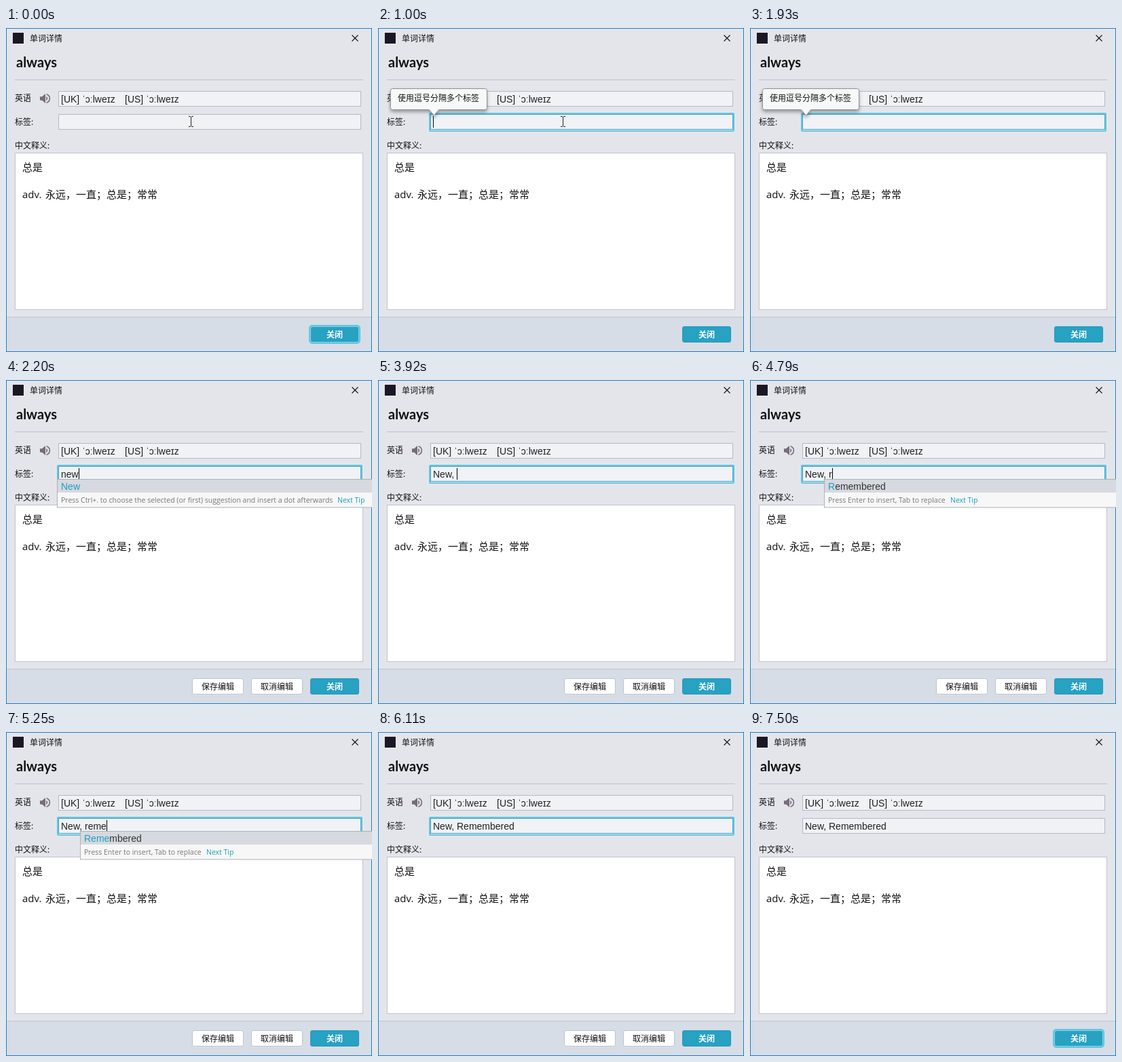
Animation of 539 by 478 pixels, one loop 8500 ms. Source, as an HTML page:

```html
<!DOCTYPE html>
<html lang="zh-CN">
<head>
<meta charset="utf-8">
<title>单词详情</title>
<style>
  html, body { margin: 0; width: 100%; height: 100%; overflow: hidden; background: #e4e5eb; }
  svg { display: block; }
  text { white-space: pre; fill: #111; }
  .cjk { font: 12px "Noto Sans CJK SC", "Noto Sans CJK", sans-serif; }
  .head { font: bold 20px Lato, sans-serif; }
  .body { font: 15px "Open Sans", "Noto Sans CJK SC", "Noto Sans CJK", sans-serif; }
  .field { font: 14px "Liberation Sans", Arial, sans-serif; fill: #1e2022; }
  .item { font: 14px "Liberation Sans", Arial, sans-serif; fill: #333; }
  .hint { font: 10.5px "Open Sans", sans-serif; fill: #777; }
  .accent { fill: #1a9fc6; }
  .link { fill: #17a0b8; }
  .primary { font-weight: bold; fill: #fff; }
</style>
</head>
<body>
<svg id="stage" width="539" height="478" viewBox="0 0 539 478">
  <defs>
    <filter id="shadow" x="-20%" y="-30%" width="140%" height="180%">
      <feDropShadow dx="0" dy="3" stdDeviation="2.8" flood-color="#000" flood-opacity=".35"/>
    </filter>
  </defs>
  <g id="base"></g>
  <g id="live"></g>
</svg>
<script>
const LOOP = 8500;
const FIELD_X = 81;
const RING = '#62c3dc';

const rect = (x, y, w, h, fill, stroke = 'none', rx = 0, sw = 1) =>
  `<rect x="${x}" y="${y}" width="${w}" height="${h}" rx="${rx}" fill="${fill}" stroke="${stroke}" stroke-width="${sw}"/>`;
const text = (x, y, cls, content) => `<text x="${x}" y="${y}" class="${cls}">${content}</text>`;
const line = (d, stroke, sw = 1) => `<path d="${d}" fill="none" stroke="${stroke}" stroke-width="${sw}"/>`;
const inputBox = y => rect(77.5, y + .5, 445, 22, '#f1f2f6', '#b1bac6');

function speaker() {
  const color = '#756c7a';
  return `<path d="M50 101.3h3.2L58 97v14l-4.8-4.3H50z" fill="${color}"/>` +
    `<path d="M59.3 100.8a3.6 3.6 0 0 1 0 6.4z" fill="${color}"/>` +
    line('M59.5 97.8a6.4 6.4 0 0 1 0 12.4', color, 1.6);
}

function base() {
  return rect(.5, .5, 538, 477, '#e4e5eb') +
    rect(0, 427, 539, 51, '#d7dde6') +
    line('M0 426.5H539', '#bcc3ce') +
    rect(10, 7, 16, 16, '#1b1724') +
    text(35, 20, 'cjk', '单词详情') +
    line('M509.5 10.5l9 9m0-9l-9 9', '#111', 1.1) +
    text(15, 58, 'head', 'always') +
    line('M13 76.5H526', '#bbc0c9') +
    text(13, 108, 'cjk', '英语') + speaker() +
    inputBox(93) +
    text(FIELD_X, 110, 'field', '[UK] ˈɔːlweɪz') +
    text(175, 110, 'field', '[US] ˈɔːlweɪz') +
    text(13, 143, 'cjk', '标签:') +
    text(13, 178, 'cjk', '中文释义:') +
    rect(13.5, 184.5, 512, 231, '#fff', '#bcc3cc') +
    text(24, 211, 'body', '总是') +
    text(24, 251, 'body', 'adv.') +
    text(58, 251, 'body', '永远，一直；总是；常常') +
    rect(.5, .5, 538, 477, 'none', '#1b7cc4');
}

function tagField({ value = '', caret, focus }) {
  const ring = focus === 'field'
    ? rect(76, 126, 448, 26, 'none', '#6ac6df', 1, 2) + rect(77.5, 127.5, 445, 22, 'none', '#39a7c8') : '';
  return inputBox(127) + ring + text(FIELD_X, 144, 'field', value) +
    (caret ? rect(caret, 130, 1, 17, '#000') : '');
}

function button(x, w, label, focused, primary) {
  const [fill, edge] = primary ? ['#27a2c3', '#2398b8'] : ['#fff', '#bcc4cf'];
  return (focused ? rect(x - 1, 439, w + 2, 26, '#a5deeb', RING, 4, 2) : '') +
    rect(x + .5, 440.5, w - 1, 23, fill, focused && primary ? '#8bd3e4' : edge, 2.5) +
    text(x + w / 2 - label.length * 6, 457, primary ? 'cjk primary' : 'cjk', label);
}

function buttons({ focus, editing }) {
  return (editing ? button(274, 76, '保存编辑', focus === 'save') + button(361, 76, '取消编辑') : '') +
    button(448, 72, '关闭', focus === 'close', true);
}

function tooltip() {
  return '<path d="M21.5 89.5H157.5a3 3 0 0 1 3 3V117.5a3 3 0 0 1-3 3H89.5L82.5 129L75.5 120.5H21.5a3 3 0 0 1-3-3V92.5a3 3 0 0 1 3-3z"' +
    ' fill="#f7f8f8" stroke="#8c9196" filter="url(#shadow)"/>' +
    text(29, 108, 'cjk', '使用逗号分隔多个标签');
}

function popup({ x, items, selected = 0, match = 0, hint, linkX }) {
  const bottom = 147 + items.length * 19;
  const rows = items.map((item, i) => {
    const y = 147 + i * 19;
    const label = `<tspan class="accent">${item.slice(0, match)}</tspan>${item.slice(match)}`;
    return (i === selected ? rect(x + 1, y, 480, 19, '#d6d9df') : '') + text(x + 6, y + 15, 'item', label);
  });
  return rect(x + .5, 146.5, 480, bottom - 124.5, '#f7f7f8', '#adb0b5') + rows.join('') +
    text(x + 6, bottom + 15, 'hint', hint) + text(linkX, bottom + 15, 'hint link', 'Next Tip');
}

const pointer = () =>
  line('M269 130.5h2.5l1 1 1-1h2.5M272.5 131v14M269 145.5h2.5l1-1 1 1h2.5', '#222');

const insertHint = { x: 109, hint: 'Press Enter to insert, Tab to replace', linkX: 295 };
const newPopup = {
  x: 75, items: ['New'], match: 3, linkX: 488,
  hint: 'Press Ctrl+. to choose the selected (or first) suggestion and insert a dot afterwards'
};
const allPopup = {
  ...insertHint, selected: 4,
  items: ['New', 'next', 'private', 'project', 'Remembered', 'tag']
};
const remPopup = match => ({ ...insertHint, items: ['Remembered'], match });

// Each entry changes only the listed properties at its time.
const steps = [
  [0, { focus: 'close', pointer: true }],
  [1000, { focus: 'field', tooltip: true, caret: 81 }],
  [1860, { pointer: false }],
  [1930, { caret: 0 }],
  [2000, { value: 'n', caret: 89, tooltip: false, editing: true }],
  [2070, { value: 'ne', caret: 97 }],
  [2200, { value: 'new', caret: 107, popup: newPopup }],
  [2660, { value: 'New', caret: 108, popup: null }],
  [3120, { caret: 0 }],
  [3520, { caret: 108 }],
  [3590, { value: 'New,', caret: 112 }],
  [3920, { value: 'New, ', caret: 116 }],
  [3990, { popup: allPopup }],
  [4390, { caret: 0 }],
  [4790, { value: 'New, r', caret: 121, popup: remPopup(1) }],
  [4860, { value: 'New, re', caret: 129, popup: remPopup(2) }],
  [4990, { value: 'New, rem', caret: 140, popup: remPopup(3) }],
  [5250, { value: 'New, reme', caret: 148, popup: remPopup(4) }],
  [5580, { value: 'New, Remembered', caret: 201, popup: null }],
  [6110, { caret: 0 }],
  [6440, { focus: 'save' }],
  [7500, { focus: 'close', editing: false }]
];

const live = document.getElementById('live');
let shown = -1;

function render(time) {
  const count = steps.filter(([start]) => start <= time).length;
  if (count === shown) return;
  shown = count;
  const state = Object.assign({}, ...steps.slice(0, count).map(([, change]) => change));
  live.innerHTML = tagField(state) + buttons(state) +
    (state.tooltip ? tooltip() : '') +
    (state.popup ? popup(state.popup) : '') +
    (state.pointer ? pointer() : '');
}

document.getElementById('base').innerHTML = base();
const begin = performance.now();
function tick() {
  render((performance.now() - begin) % LOOP);
  requestAnimationFrame(tick);
}
tick();
</script>
</body>
</html>
```
